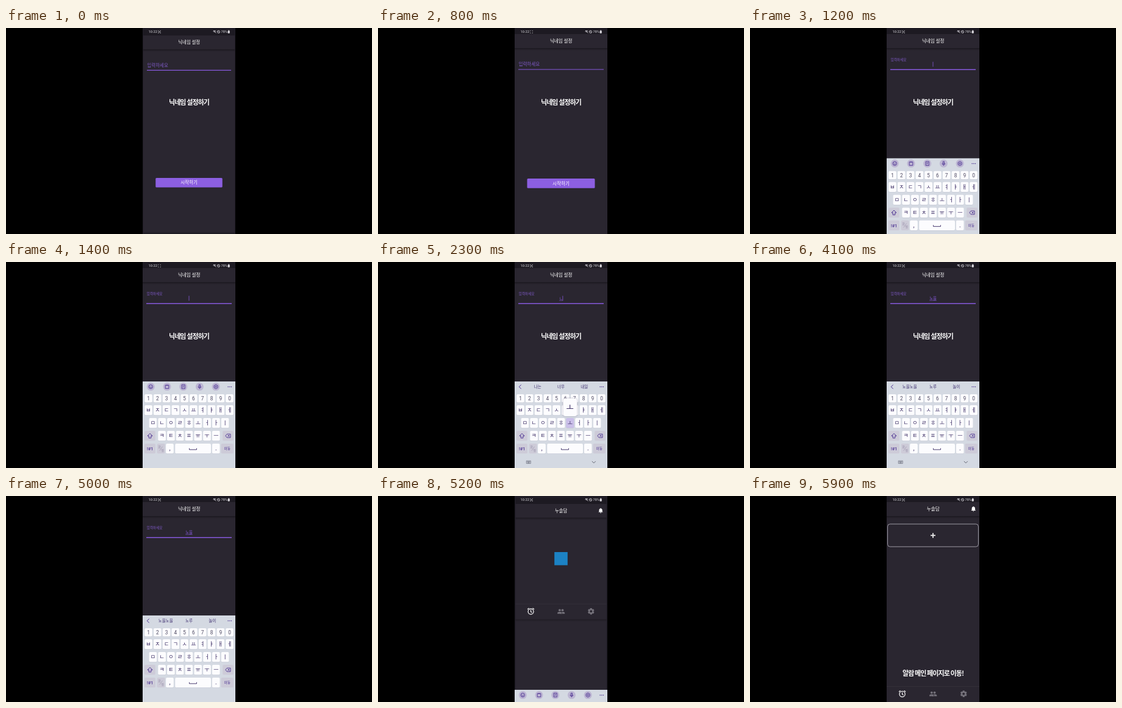
These frames come from a looping animation (600x338 px, 6 s). An HTML page with a canvas:

```html
<!DOCTYPE html>
<html lang="ko">
<head>
<meta charset="utf-8">
<style>
html, body { margin: 0; width: 100%; height: 100%; overflow: hidden; background: #000; }
canvas { display: block; width: 600px; height: 338px; }
</style>
</head>
<body>
<canvas id="stage"></canvas>
<script>
const W = 600, H = 338, LOOP = 6000, STEP = 100;
const canvas = document.getElementById('stage');
const ctx = canvas.getContext('2d');
const dpr = window.devicePixelRatio || 1;
canvas.width = W * dpr;
canvas.height = H * dpr;

const FONT = '"Noto Sans CJK KR", "Noto Sans CJK", "Noto Sans", sans-serif';
const LATIN = 'Roboto, "Noto Sans", sans-serif';
const BG = '#2a2630', PURPLE = '#8659dc', INK = '#4a2f91', GREY = '#74717a';
const APP_NAME = '누솔담';

const clamp = (v) => Math.max(0, Math.min(1, v));
const mix = (a, b, k) => a + (b - a) * k;
const progress = (t, start, length) => clamp((t - start) / length);
const easeOut = (k) => 1 - (1 - k) ** 3;

// Linear interpolation through [time, value] points.
function track(t, points) {
  let [t0, v0] = points[0];
  for (const [t1, v1] of points) {
    if (t < t1) return t1 === t0 ? v0 : mix(v0, v1, clamp((t - t0) / (t1 - t0)));
    [t0, v0] = [t1, v1];
  }
  return v0;
}

function text(str, x, y, size, color, { align = 'center', weight = 400, font = FONT, spacing = 0 } = {}) {
  ctx.font = `${weight} ${size}px ${font}`;
  ctx.letterSpacing = spacing + 'px';
  ctx.textAlign = align;
  ctx.fillStyle = color;
  ctx.fillText(str, x, y + size * 0.37);
  ctx.letterSpacing = '0px';
}

function box(x, y, w, h, r, color) {
  ctx.beginPath();
  ctx.roundRect(x, y, w, h, r);
  ctx.fillStyle = color;
  ctx.fill();
}

function disc(x, y, r, color) {
  ctx.beginPath();
  ctx.arc(x, y, r, 0, Math.PI * 2);
  ctx.fillStyle = color;
  ctx.fill();
}

function stroke(d, x, y, color, width) {
  ctx.save();
  ctx.translate(x, y);
  ctx.strokeStyle = color;
  ctx.lineWidth = width;
  ctx.stroke(new Path2D(d));
  ctx.restore();
}

function fill(d, x, y, color) {
  ctx.save();
  ctx.translate(x, y);
  ctx.fillStyle = color;
  ctx.fill(new Path2D(d), 'evenodd');
  ctx.restore();
}

function shade(y, h, alpha) {
  const g = ctx.createLinearGradient(0, y, 0, y + h);
  g.addColorStop(0, `rgba(0,0,0,${alpha})`);
  g.addColorStop(1, 'rgba(0,0,0,0)');
  ctx.fillStyle = g;
  ctx.fillRect(224, y, 152, h);
}

function statusBar(t) {
  const c = '#dcdae0', phase = (t % 1000) / 1000;
  text('10:22', 233.5, 6.3, 5.8, c, { align: 'left', font: LATIN });
  stroke('M-2-1V-2H-1M1-2H2V-1M2 1V2H1M-1 2H-2V1', 251.5, 6.4, c, 0.6);
  if (phase < 0.35 || phase > 0.85) stroke('M-1.4-1.4L1.4 1.4M1.4-1.4L-1.4 1.4', 251.5, 6.4, c, 0.7);
  stroke('M-2.5-1Q0-3 2.5-1M-1.3 .4Q0-.7 1.3 .4M-2-2.2L2.4 2', 342, 6.3, c, 0.8);
  stroke('M2.1 0A2.1 2.1 0 1 1-2.1 0A2.1 2.1 0 1 1 2.1 0M-1.4-1.4L1.4 1.4', 348.5, 6.3, c, 0.8);
  text('78%', 352.5, 6.3, 5.6, c, { align: 'left', font: LATIN });
  box(363.6, 4.2, 3.2, 4.6, 0.8, c);
  box(364.5, 3.5, 1.4, 1, 0.2, c);
}

function pageBase(title) {
  ctx.fillStyle = BG;
  ctx.fillRect(224, 0, 152, H);
  ctx.fillStyle = '#1d1a22';
  ctx.fillRect(224, 0, 152, 10);
  shade(33, 4, 0.35);
  text(title, 300.2, 21.3, 7.6, '#fff', { weight: 500 });
}

function scaled(k, draw) {
  ctx.save();
  ctx.translate(300, 169);
  ctx.scale(k, k);
  ctx.translate(-300, -169);
  draw();
  ctx.restore();
}

// Each key press: time, key, and the field content afterwards.
const presses = [
  [1900, 'ㄴ', 'ㄴ'], [2300, 'ㅗ', '노'], [2600, 'ㅇ', '농'],
  [2900, 'ㅡ', '노으'], [3400, 'ㄹ', '노을']
];
const PRESS_LENGTH = 200;

function typed(t) {
  let value = '', last = 900;
  for (const [at, , result] of presses) {
    if (t >= at + PRESS_LENGTH) { value = result; last = at; }
  }
  return { value, last };
}

function nicknamePage(t) {
  pageBase('닉네임 설정');
  const lift = easeOut(progress(t, 900, 250));
  text('입력하세요', 230.4, mix(59.2, 51.4, lift), mix(7.6, 5.7, lift), '#7d58c4', { align: 'left' });
  box(230, 67.4, 140, mix(1.1, 1.5, lift), 0, PURPLE);

  const { value, last } = typed(t);
  text(value, 300, 59.4, 6.3, PURPLE);
  const half = value ? ctx.measureText(value).width / 2 : 0;
  if (value) box(300 - half, 62.8, half * 2, 0.6, 0, PURPLE);
  if (lift === 1 && (t - last) % 1000 < 600) box(299.6 + half, 55.4, 0.8, 8, 0, PURPLE);

  box(244.5, 247, 111, 15.8, 1.6, '#8c5fe1');
  text('시작하기', 300, 254.9, 7.6, '#fff');
}

function alarmIcon(x, y) {
  stroke('M4.6 .4A4.6 4.6 0 1 1-4.6 .4A4.6 4.6 0 1 1 4.6 .4M0-2.4V.8L2 2M-5.6-3.2L-3-5.4M5.6-3.2L3-5.4', x, y, '#fff', 1.2);
}

function peopleIcon(x, y) {
  for (const dx of [-2.2, 2.6]) {
    disc(x + dx, y - 2, 1.9, GREY);
    fill('M-3.7 4V2.6Q-3.4 .7 0 .7Q3.4 .7 3.7 2.6V4Z', x + dx, y, GREY);
  }
  box(x + 0.9, y + 1, 0.7, 3.2, 0, BG);
}

function gearIcon(x, y) {
  for (let i = 0; i < 3; i++) {
    ctx.save();
    ctx.translate(x, y);
    ctx.rotate(i * Math.PI / 3);
    box(-1.6, -5.4, 3.2, 10.8, 0.6, GREY);
    ctx.restore();
  }
  disc(x, y, 4.1, GREY);
  disc(x, y, 1.9, BG);
}

function mainPage(t) {
  pageBase(APP_NAME);
  fill('M-3.8 2.6L-2.7 1.4V-1Q-2.7-3.2-.7-3.7Q0-4.9 .7-3.7Q2.7-3.2 2.7-1V1.4L3.8 2.6ZM-1 3.1H1Q.8 4.2 0 4.2Q-.8 4.2-1 3.1Z', 366.3, 21.3, '#fff');
  const bottom = track(t, [[5100, 196], [5200, 203], [5300, 300], [5400, H]]);
  const navTop = bottom - 26;
  if (t < 5500) {
    const cy = (33 + navTop) / 2 - 3.5;
    box(289, cy - 11, 22, 22, 0, '#1c82c4');
  } else {
    ctx.beginPath();
    ctx.roundRect(225.6, 46, 148.8, 37.2, 4);
    ctx.strokeStyle = '#aaa7b0';
    ctx.lineWidth = 0.9;
    ctx.stroke();
    stroke('M-4 0H4M0-4V4', 300, 64.7, '#eee', 1.8);
  }
  box(224, navTop, 152, 0.7, 0, '#37333d');
  if (bottom < H) shade(bottom, 4, 0.25);
  const y = bottom - 13.4;
  alarmIcon(249.6, y);
  peopleIcon(300, y);
  gearIcon(350.2, y);
}

const PITCH = 14.78;
const keys = [];
function addRow(chars, x, y, h) {
  [...chars].forEach((char, i) => keys.push({ char, x: x + i * PITCH, y, w: 12.8, h }));
}
addRow('1234567890', 233.5, 217, 13.5);
addRow('ㅂㅈㄷㄱㅅㅛㅕㅑㅐㅔ', 233.5, 235, 16.3);
addRow('ㅁㄴㅇㄹㅎㅗㅓㅏㅣ', 240.9, 256, 16.3);
addRow('ㅋㅌㅊㅍㅠㅜㅡ', 255.6, 277, 16.3);
keys.push({ char: ',', x: 268.5, y: 298, w: 12.8, h: 16.3 }, { char: '.', x: 344.2, y: 298, w: 12.8, h: 16.3 });

function toolbar() {
  for (let i = 0; i < 5; i++) disc(237.3 + i * 26.7, 204.6, 6.5, '#bdb6d3');
  const line = (d, i) => stroke(d, 237.3 + i * 26.7, 204.6, INK, 0.9);
  line('M3.2 0A3.2 3.2 0 1 1-3.2 0A3.2 3.2 0 1 1 3.2 0M-1.6 .7Q0 2.4 1.6 .7M-1.3-1.2V-.4M1.3-1.2V-.4', 0);
  line('M-2.8-2.6H2.8V3H-2.8ZM-1.4-2.2H1.4', 1);
  line('M-2.6-3.2H2.6V3.2H-2.6ZM-1.1-1H1.2M-1.1 .8H.6', 2);
  line('M-1.1-3.2H1.1V.6H-1.1ZM-2.5-.2Q-2.3 2 0 2Q2.3 2 2.5-.2M0 2V3.6', 3);
  line('M0-3.5L3-1.8V1.8L0 3.5L-3 1.8V-1.8ZM1.2 0A1.2 1.2 0 1 1-1.2 0A1.2 1.2 0 1 1 1.2 0', 4);
}

function suggestions(value) {
  const words = {
    'ㄴ': ['나는', '너무', '내일'], '노': ['노래', '노을', '노력'], '농': ['농구', '노을', '농구농구'],
    '노으': ['노을', '노은', '노을빛'], '노을': ['노을노을', '노루', '놀이']
  }[value];
  stroke('M1.7-3.4L-1.7 0L1.7 3.4', 233, 204.8, INK, 1);
  words.forEach((word, i) => text(word, 261.7 + i * 38.3, 204.8, 6.5, '#3a2a6c'));
}

function keyboard(t) {
  const drop = t < 2000
    ? 142 * (1 - easeOut(progress(t, 1000, 400)))
    : track(t, [[5000, 0], [5100, 45], [5200, 122], [5300, 142]]);
  if (drop >= 142) return;
  const { value } = typed(t);
  const press = presses.find(([at]) => t >= at && t < at + PRESS_LENGTH);
  const active = press && keys.find((k) => k.char === press[1]);

  ctx.save();
  ctx.translate(0, drop);
  ctx.fillStyle = '#d4d9e2';
  ctx.fillRect(224, 196, 152, 150);
  if (value && t < 5100) suggestions(value); else toolbar();
  for (const dx of [-2.6, 0, 2.6]) disc(366.8 + dx, 204.8, 0.8, INK);

  for (const k of keys) {
    box(k.x - k.w / 2, k.y + 0.5, k.w, k.h, 2, '#bfc4cf');
    box(k.x - k.w / 2, k.y, k.w, k.h, 2, k === active ? '#cabfe9' : '#fcfcfe');
    const digit = k.y === 217;
    text(k.char, k.x, k.y + k.h / 2, digit ? 8.3 : 9, digit ? '#4d4860' : '#35265f', { font: digit ? LATIN : FONT, weight: digit ? 400 : 500 });
  }
  const special = (x, y, w) => box(x, y, w, 16.3, 2, '#cdcbd8');
  special(227, 277, 17.8);
  special(355.2, 277, 17.6);
  special(227, 298, 18);
  special(247.6, 298, 13);
  special(352.6, 298, 20.2);
  stroke('M0-4L4 0H1.8V3.6H-1.8V0H-4Z', 236, 285.3, INK, 1);
  stroke('M-4.2 0L-1.8-2.9H4V2.9H-1.8ZM-.3-1.3L2.3 1.3M2.3-1.3L-.3 1.3', 364, 285.2, INK, 0.9);
  text('!#1', 236.2, 306.2, 7.2, INK, { font: LATIN, weight: 500 });
  text('한', 251.8, 303.6, 4.8, '#8d849f');
  text('영', 256.6, 308.8, 4.8, '#8d849f');
  stroke('M-2.4 3.4L2.4-3.4', 254.2, 306.2, '#8d849f', 0.5);
  box(277.2, 298.5, 58.8, 16.3, 2, '#bfc4cf');
  box(277.2, 298, 58.8, 16.3, 2, '#fcfcfe');
  stroke('M-6-1V1.3H6V-1', 306.5, 306.6, '#4b3d70', 1);
  text('이동', 362.7, 306.2, 5.7, INK, { weight: 500 });

  ctx.globalAlpha = t < 5000 ? progress(t, 1400, 200) : 0;
  stroke('M-3.5-2.2H3.5V2.2H-3.5ZM-2.3-.8H2.4M-2.3 .4H2.4M-1.3 1.4H1.3', 246.8, 328.4, '#656777', 0.7);
  stroke('M-3-1.5L0 1.5L3-1.5', 353.8, 328.4, '#555765', 0.9);
  ctx.globalAlpha = 1;

  if (active) {
    ctx.save();
    ctx.shadowColor = 'rgba(40,30,70,.35)';
    ctx.shadowBlur = 3 * dpr;
    box(active.x - 11.3, active.y - 32.3, 22.8, 29.4, 4, '#fcfcfe');
    ctx.restore();
    text(active.char, active.x, active.y - 17.5, 13.5, '#35265f');
  }
  ctx.restore();
}

function caption(str, y) {
  text(str, 300, y, 11, '#fff', { weight: 900, spacing: -0.9 });
}

function render(t) {
  ctx.setTransform(dpr, 0, 0, dpr, 0, 0);
  ctx.fillStyle = '#000';
  ctx.fillRect(0, 0, W, H);
  ctx.save();
  ctx.beginPath();
  ctx.rect(224, 0, 152, H);
  ctx.clip();
  ctx.fillStyle = '#201d26';
  ctx.fillRect(224, 0, 152, H);

  if (t < 5300) scaled(mix(0.986, 1, easeOut(progress(t, 0, 300))), () => nicknamePage(t));
  if (t >= 5100) {
    const k = progress(t, 5050, 300);
    ctx.globalAlpha = clamp(k / 0.4);
    if (k < 1 && k >= 0.4) {
      ctx.fillStyle = '#201d26';
      ctx.fillRect(224, 0, 152, H);
    }
    scaled(mix(0.85, 1, easeOut(k)), () => mainPage(t));
    ctx.globalAlpha = 1;
  }
  keyboard(t);
  statusBar(t);
  ctx.restore();

  if (t < 4600) caption('닉네임 설정하기', 121.5);
  if (t >= 5700) caption('알람 메인 페이지로 이동!', 290.5);
}

function tick() {
  const t = performance.now() % LOOP;
  render(Math.floor(t / STEP) * STEP);
  requestAnimationFrame(tick);
}
tick();
</script>
</body>
</html>
```
